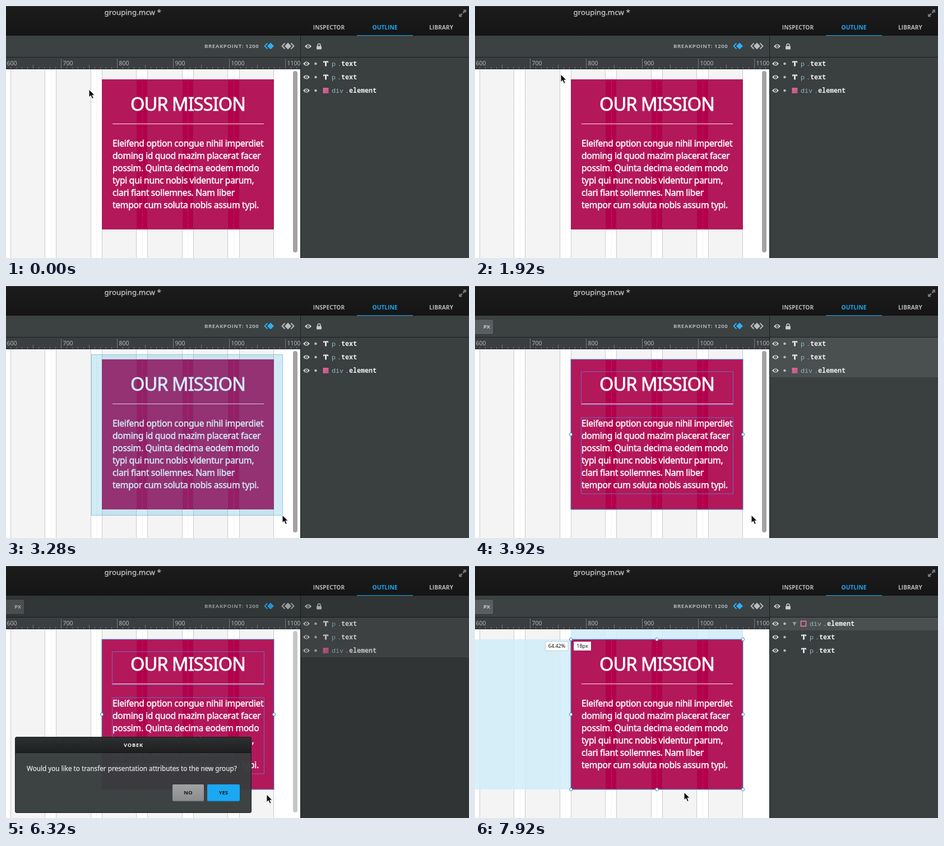
Write an HTML page that moves like this. It is 826 by 450 pixels and loops after 8 s.

```html
<!DOCTYPE html>
<html lang="en">
<head>
<meta charset="utf-8">
<title>Grouping elements</title>
<style>
html, body { margin: 0; width: 100%; height: 100%; overflow: hidden; background: #fff; }
svg { display: block; width: 826px; height: 450px; }
.ui { font-family: "Open Sans", sans-serif; font-weight: 700; }
.sans { font-family: "Noto Sans", sans-serif; }
.mono { font: 11.67px "Noto Sans Mono", monospace; }
.tab { font-size: 10.2px; fill: #b4b6b7; }
.small { font-size: 9.5px; }
.copy { fill: #fff; stroke: #fff; stroke-width: .45px; }
.heading { font-size: 32.5px; letter-spacing: -.9px; stroke-width: .8px; }
.body { font-size: 15.6px; letter-spacing: -.28px; }
.tip { font: 500 9px "Noto Sans", sans-serif; fill: #111; }

.anim, .anim-all > * { animation: 8s step-end infinite; }
#multi { animation-name: multi; }
#group, #newRows { animation-name: group; }
#oldRows { animation-name: ungrouped; }
#unit { animation-name: unit; }
#tips { animation-name: tips; }
#hover { animation-name: hover; }
#dialog, #dim { animation-name: dialog; animation-timing-function: linear; }
#scrollbar { animation-name: scrollbar; animation-timing-function: linear; }
#marquee { animation-name: marquee; }
#pointer { animation-name: pointer; }

@keyframes multi { 0% { visibility: hidden } 43% { visibility: visible } 92%, 100% { visibility: hidden } }
@keyframes group { 0% { visibility: hidden } 92%, 100% { visibility: visible } }
@keyframes ungrouped { 0% { visibility: visible } 92%, 100% { visibility: hidden } }
@keyframes unit { 0% { visibility: hidden } 43%, 100% { visibility: visible } }
@keyframes tips { 0% { visibility: hidden } 99%, 100% { visibility: visible } }
@keyframes hover { 0% { visibility: hidden } 82.2% { visibility: visible } 92%, 100% { visibility: hidden } }
@keyframes scrollbar { 0%, 76.5% { opacity: 1 } 83%, 100% { opacity: 0 } }
@keyframes dialog {
  0%, 60.5% { opacity: 0 }
  62.5% { opacity: 1; animation-timing-function: step-end }
  92%, 100% { opacity: 0 }
}
@keyframes marquee {
  0% { width: 0; height: 0; opacity: 0 }
  25% { width: 0; height: 0; opacity: 1; animation-timing-function: cubic-bezier(.4, 0, .7, .9) }
  32% { width: 293px; height: 255px; opacity: 1; animation-timing-function: cubic-bezier(.1, .6, .4, 1) }
  41% { width: 341px; height: 287px; opacity: 1 }
  43%, 100% { width: 341px; height: 287px; opacity: 0 }
}
@keyframes pointer {
  0%, 1% { transform: translate(148px, 149px); opacity: 1; animation-timing-function: ease-in-out }
  16% { transform: translate(153px, 122px); opacity: 1 }
  25% { transform: translate(153px, 122px); opacity: 1; animation-timing-function: cubic-bezier(.4, 0, .7, .9) }
  32% { transform: translate(447px, 380px); opacity: 1; animation-timing-function: cubic-bezier(.1, .6, .4, 1) }
  41% { transform: translate(493px, 409px); opacity: 1 }
  59% { transform: translate(493px, 409px); opacity: 0 }
  77% { transform: translate(493px, 409px); opacity: 1; animation-timing-function: ease-in-out }
  83%, 100% { transform: translate(373px, 404px); opacity: 1 }
}
</style>
</head>
<body>
<svg viewBox="0 0 826 450">
  <defs>
    <linearGradient id="barFill" x2="0" y2="1">
      <stop stop-color="#1c1c1c"/><stop offset="1" stop-color="#151515"/>
    </linearGradient>
    <linearGradient id="titleFill" x2="0" y2="1">
      <stop stop-color="#2b2e2f"/><stop offset="1" stop-color="#1a1c1d"/>
    </linearGradient>
    <linearGradient id="noFill" x2="0" y2="1">
      <stop stop-color="#a0a2a4"/><stop offset="1" stop-color="#8b8d8f"/>
    </linearGradient>
    <linearGradient id="pinkFill" x2="1" y2="1">
      <stop stop-color="#e0699a"/><stop offset="1" stop-color="#b8567f"/>
    </linearGradient>
    <g id="eye">
      <path d="M-6 0Q0-7.4 6 0Q0 7.4-6 0Z" fill="#d3d7d8"/>
      <circle r="2.5" fill="#393e3f"/><circle r="1" fill="#d3d7d8"/>
    </g>
    <path id="tee" d="M-4.5-4.5H4.5V-1.6H3.3L2.8-2.7H1.3V4.5H-1.3V-2.7H-2.8L-3.3-1.6H-4.5Z" fill="#f2f4f4"/>
  </defs>

  <rect width="826" height="450" fill="#fff"/>
  <rect x="171" y="131" width="307" height="268" fill="#b4004c"/>
  <g id="columns"></g>
  <g class="sans copy">
    <text class="heading" x="324.5" y="186.5" text-anchor="middle">OUR MISSION</text>
    <g class="body" id="body"></g>
  </g>
  <path d="M190 210.5H460" stroke="#fff" stroke-opacity=".9"/>

  <g class="anim" id="multi" fill="none" stroke="#3b82c4">
    <rect x="171" y="131" width="307" height="268"/>
    <g stroke="#6a6cbc">
      <rect x="189.5" y="153" width="271" height="59"/>
      <rect x="189.5" y="235" width="271" height="136"/>
    </g>
    <g fill="#fff">
      <circle cx="171" cy="265" r="2.7"/><circle cx="478" cy="265" r="2.7"/>
    </g>
  </g>

  <g class="anim" id="group">
    <path d="M0 131H171V399H0ZM171 113H478V131H171Z" fill="#d2eefa" fill-opacity=".85"/>
    <rect x="171" y="131" width="307" height="268" rx="1" fill="none" stroke="#3b8fcb"/>
    <g id="handles" fill="#fff" stroke="#3b8fcb"></g>
  </g>
  <g class="anim tip" id="tips">
    <path d="M126 135H166V151H126ZM176 135H207V151H176Z" fill="#fff" stroke="#000" stroke-opacity=".15"/>
    <text x="146" y="146" text-anchor="middle">64.42%</text>
    <text x="191.5" y="146" text-anchor="middle">18px</text>
  </g>

  <rect class="anim" id="marquee" x="152.5" y="122.5" fill="#199bd7" fill-opacity=".2" stroke="#4aa3cf" stroke-opacity=".55"/>
  <rect class="anim" id="scrollbar" x="512" y="116" width="8" height="324" rx="4" fill="#a3a3a3"/>

  <rect y="92" width="525" height="21" fill="#3a3e40"/>
  <g id="ruler" class="sans" font-size="10.5" fill="#b3b6b8"></g>
  <rect y="112" width="525" height="1" fill="#2b2e2f"/>

  <rect y="53" width="525" height="39" fill="#3c4142"/>
  <rect x="526" y="53" width="300" height="397" fill="#3a3f40"/>
  <path d="M0 91.5H826M525.5 53V450" stroke="#1d1f20"/>
  <rect width="826" height="53" fill="url(#barFill)"/>
  <path d="M0 .5H826" stroke="#3a3a3a"/>
  <text class="sans" x="175.5" y="16" font-size="13.3" fill="#bcbebf" stroke="#bcbebf" stroke-width=".35">grouping.mcw *</text>

  <g class="ui tab" text-anchor="middle">
    <text x="576" y="42.4">INSPECTOR</text>
    <text x="676" y="42.4" fill="#1ea9f2">OUTLINE</text>
    <text x="776.5" y="42.4">LIBRARY</text>
  </g>
  <rect x="626" y="52" width="100" height="1.2" fill="#2396d3"/>
  <path d="M815 6.5H821V12.5L819 10.5L816.3 13.2L814.3 11.2L817 8.5ZM808 13.5L810 15.5L812.7 12.8L814.7 14.8L812 17.5L814 19.5H808Z" fill="#77797a"/>

  <g class="anim" id="unit">
    <rect x="-6" y="59.5" width="39" height="27" rx="2.5" fill="#595e60" stroke="#303435"/>
    <text class="ui small" x="15" y="75.5" fill="#c8cbcc">PX</text>
  </g>
  <text class="ui small" x="354" y="75.2" letter-spacing=".6" fill="#b0b4b5">BREAKPOINT: 1200</text>
  <g fill="#2db0f5" stroke="#2db0f5">
    <path d="M472 65.5L478 71.5L472 77.5L466 71.5Z" stroke="none"/>
    <path d="M466.5 66.5L461.5 71.5L466.5 76.5" fill="none" stroke-width="1.8"/>
  </g>
  <g fill="#b9bdbe" stroke="#b9bdbe">
    <path d="M503 65.5L509 71.5L503 77.5L497 71.5Z" stroke="none"/>
    <path d="M497.5 66.5L492.5 71.5L497.5 76.5M508.5 66.5L513.5 71.5L508.5 76.5" fill="none" stroke-width="1.8"/>
  </g>

  <use href="#eye" x="539" y="72"/>
  <rect x="554" y="71.5" width="9" height="6" rx="1" fill="#c6cacb"/>
  <path d="M556 72V70a2.5 2.5 0 0 1 5 0V72" fill="none" stroke="#c6cacb" stroke-width="1.5"/>
  <g class="mono anim-all">
    <g id="oldRows"></g>
    <g id="newRows"></g>
  </g>

  <path class="anim" id="dim" d="M0 53H826V450H526V92H0Z" fill="#000" fill-opacity=".17"/>

  <g class="anim" id="dialog">
    <rect x="16.5" y="305.5" width="421" height="135" rx="2.5" fill="#373c3d" fill-opacity=".97" stroke="#1a1c1d"/>
    <path d="M17 333.5V308q0-2 2-2H435q2 0 2 2V333.5Z" fill="url(#titleFill)" fill-opacity=".93"/>
    <path d="M17 333.5H437" stroke="#141515"/>
    <text class="ui" x="227.5" y="323" font-size="9.3" letter-spacing=".8" text-anchor="middle" fill="#f0f1f1">VOBEK</text>
    <text class="sans" x="37" y="365.5" font-size="11.73" fill="#e3e6e7" stroke="#e3e6e7" stroke-width=".25">Would you like to transfer presentation attributes to the new group?</text>
    <rect x="297" y="390" width="56" height="30.5" rx="2" fill="#5c5f61"/>
    <rect x="297" y="390" width="56" height="29.5" rx="2" fill="url(#noFill)"/>
    <rect x="359" y="390" width="58" height="30.5" rx="2" fill="#0f6fa8"/>
    <rect x="359" y="390" width="58" height="29.5" rx="2" fill="#1ba8f2"/>
    <rect class="anim" id="hover" x="359" y="390" width="58" height="29.5" rx="2" fill="#42b9f2"/>
    <g class="ui small" text-anchor="middle" fill="#111a20">
      <text x="325" y="408">NO</text><text x="388" y="408">YES</text>
    </g>
  </g>

  <g class="anim" id="pointer">
    <path d="M0 0V14L3.3 11L5.7 16.5L8.3 15.4L5.9 10.2H10.2Z" fill="#0a0a0a" stroke="#fff" stroke-linejoin="round"/>
  </g>
</svg>
<script>
const fill = (id, html) => { document.getElementById(id).innerHTML = html; };
const range = n => [...Array(n).keys()];

// Layout grid: six columns with a dotted line in each gutter
const pitch = 81.6;
fill('columns', range(6).map(i => {
  const left = Math.floor(8 + i * pitch), right = Math.floor(70.4 + i * pitch);
  const gutter = Math.floor(80 + i * pitch) + .5;
  return `<rect x="${left}" y="113" width="${right - left}" height="337" fill="#afafaf" fill-opacity=".137"/>
    <path d="M${left + .5} 113V450M${right - .5} 113V450" stroke="#505050" stroke-opacity=".25"/>` +
    (i < 5 ? `<path d="M${gutter} 113V450" stroke="#b0b0b0" stroke-opacity=".3" stroke-dasharray="2"/>` : '');
}).join(''));

fill('body', [
  'Eleifend option congue nihil imperdiet',
  'doming id quod mazim placerat facer',
  'possim. Quinta decima eodem modo',
  'typi qui nunc nobis videntur parum,',
  'clari fiant sollemnes. Nam liber',
  'tempor cum soluta nobis assum typi.'
].map((line, i) => `<text x="190" y="${250.7 + i * 22}">${line}</text>`).join(''));

const ticks = range(53).map(i => {
  const top = i % 10 == 0 ? 94 : i % 5 == 0 ? 105 : 109;
  return `M${i * 10 - 1.5} ${top}V112`;
}).join('');
const labels = range(6).map(i => `<text x="${i * 100 + 1.5}" y="106">${600 + i * 100}</text>`).join('');
fill('ruler', `<path d="${ticks}" stroke="#74797a"/>${labels}`);

fill('handles', [171, 324.5, 478].flatMap(x => [131, 265, 399].map(y =>
  x == 324.5 && y == 265 ? '' : `<circle cx="${x}" cy="${y}" r="2.7"/>`)).join(''));

const icons = {
  text: (x, y) => `<use href="#tee" x="${x}" y="${y}"/>`,
  box: (x, y) => `<rect x="${x - 5}" y="${y - 5}" width="10" height="10" fill="url(#pinkFill)"/>`,
  frame: (x, y) => `<rect x="${x - 5}" y="${y - 4.5}" width="9" height="9" fill="none" stroke="#ee78a6" stroke-width="1.6"/>
    <path d="M${x - 20} ${y - 3}h7l-3.5 7z" fill="#92989a"/>`
};
const row = (i, icon, tag, name, x = 581) => {
  const y = 103 + i * 24, end = x + tag.length * 7 + 3;
  return `<use href="#eye" x="536" y="${y}"/><circle cx="552.5" cy="${y}" r="2.3" fill="#b4b9ba"/>
    ${icons[icon](x - 10.5, y)}
    <text y="${y + 4}"><tspan x="${x}" fill="#93b7c5">${tag}</tspan><tspan x="${end}" fill="#b9c0c2">.</tspan><tspan
      x="${end + 7}" fill="#eceeee" font-weight="600">${name}</tspan></text>`;
};
fill('oldRows', '<rect class="anim" style="animation-name:multi" x="526" y="92" width="300" height="71" fill="#4a4f50"/>' +
  row(0, 'text', 'p', 'text') + row(1, 'text', 'p', 'text') + row(2, 'box', 'div', 'element'));
fill('newRows', '<rect x="526" y="92" width="300" height="23" fill="#4a504f"/>' +
  row(0, 'frame', 'div', 'element', 597) + row(1, 'text', 'p', 'text', 597) + row(2, 'text', 'p', 'text', 597));
</script>
</body>
</html>
```
